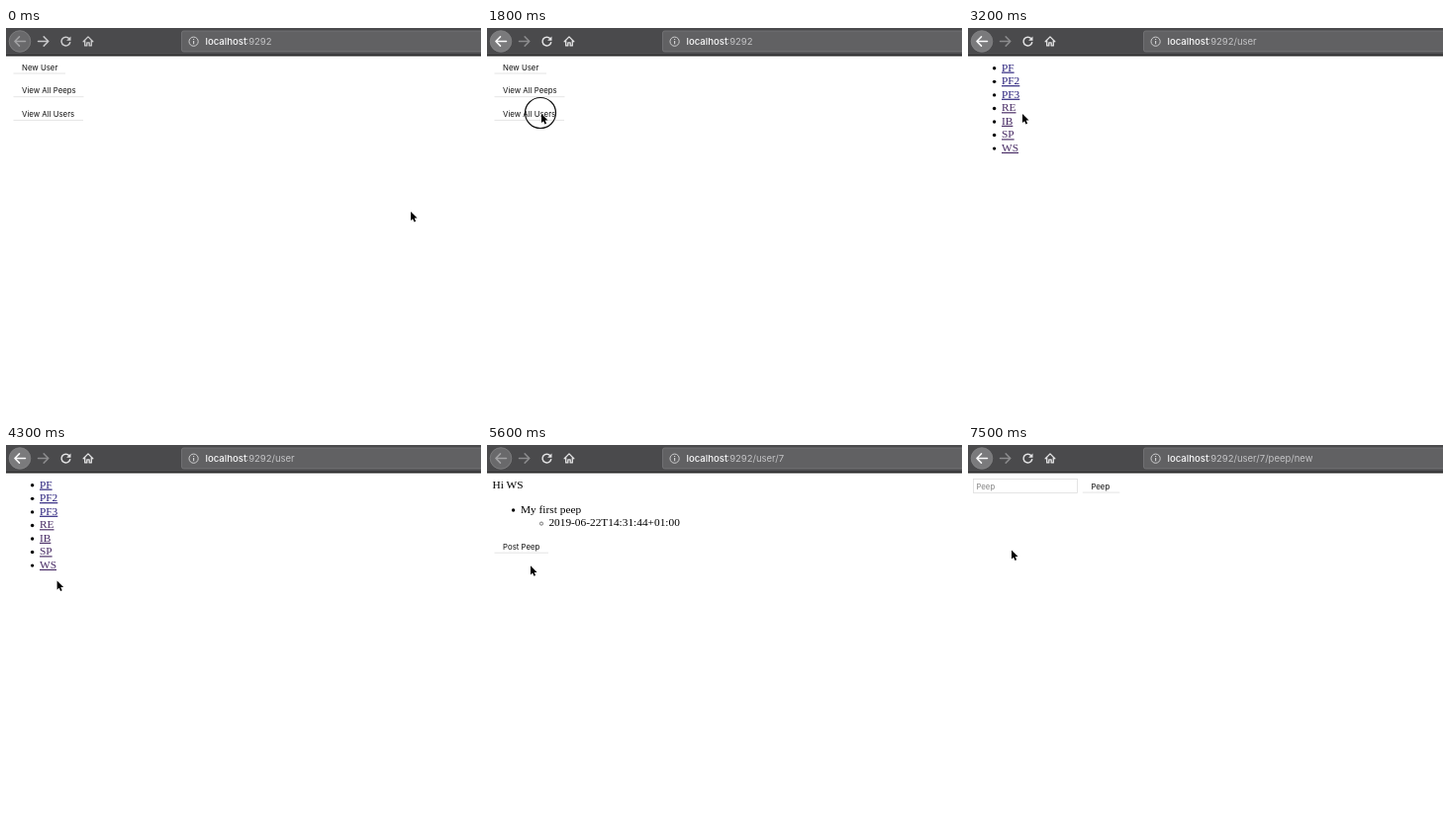
Recreate the animation shown at these times as an HTML page. Size 480 by 394 pixels, loop 8000 ms.

```html
<!DOCTYPE html>
<html lang="en">
<head>
<meta charset="utf-8">
<style>
  html, body { margin: 0; width: 100%; height: 100%; overflow: hidden; background: #fff; }
  svg { display: block; width: 100%; height: 100%; }
  .ui { font: 7.8px Inter, Roboto, sans-serif; fill: #111; }
  .doc { font: 11.35px "Liberation Serif", serif; }
  .url { font: 500 9.6px Inter, Roboto, sans-serif; fill: #f9f9fa; }
  #path { font-size: 9.5px; font-weight: 400; fill: #c4c4c6; }
  .icon { fill: none; stroke: #e4e4e5; stroke-width: 1.5; stroke-linecap: round; stroke-linejoin: round; }
  .edge { fill: none; stroke: #dedede; stroke-width: .8; }
</style>
</head>
<body>
<svg viewBox="0 0 480 394">
  <defs>
    <linearGradient id="blue" x2="0" y2="1">
      <stop stop-color="#6ba6f8"/><stop offset="1" stop-color="#2c66e6"/>
    </linearGradient>
  </defs>

  <rect width="480" height="28" fill="#4a4a4c"/>
  <rect y="27.4" width="480" height="1.1" fill="#161617"/>
  <circle id="disc" cx="14" cy="13.5" r="10.8" stroke="#88888a" stroke-width=".7"/>
  <path id="back" class="icon" d="M19.5 13.5H8.9M13.5 8.9L8.9 13.5L13.5 18.1"/>
  <path id="forward" class="icon" d="M32.5 13.5H42.8M38.2 8.9L42.8 13.5L38.2 18.1"/>
  <g id="tools">
    <path class="icon" d="M63.9 10.8A4.4 4.4 0 1 0 64.7 14.8"/>
    <path d="M65.5 8.4V12.8H61.1Z" fill="#e4e4e5"/>
    <path class="icon" style="stroke-width:1.3" d="M78.2 13.7L83 8.9L87.8 13.7M79.7 12.8V17.9H81.8V14.9H84.2V17.9H86.3V12.8"/>
  </g>
  <rect x="177.5" y="3" width="310" height="21" rx="2" fill="#616163" stroke="#78787a" stroke-width=".8"/>
  <g fill="none" stroke="#cfcfd0">
    <circle cx="189.6" cy="13.7" r="4.6"/>
    <path d="M189.6 13V16.3M189.6 10.9V12" stroke-width="1.2"/>
  </g>
  <text class="url" x="201.5" y="17.2">localhost</text>
  <text class="url" id="path" x="242.4" y="17.2"></text>

  <g id="home"></g>
  <g id="list" class="doc"></g>
  <g id="user" class="doc">
    <text x="5.5" y="43.6">Hi WS</text>
    <circle cx="26.6" cy="66" r="1.7"/>
    <text x="34" y="68.7">My first peep</text>
    <circle cx="55" cy="79.6" r="1.6" fill="none" stroke="#444" stroke-width=".7"/>
    <text x="62.4" y="82.2">2019-06-22T14:31:44+01:00</text>
  </g>
  <g id="form">
    <rect class="edge" x="5.5" y="34.5" width="105" height="14"/>
    <text class="ui" x="8.4" y="44.7" style="fill:#858585">Peep</text>
  </g>

  <circle id="ring" r="15.5" fill="none" stroke="#111" stroke-width="1.2"/>
  <g id="arrow">
    <path transform="scale(.86)" d="M0 0V10.6L2.4 8.4L4.1 12.2L5.9 11.4L4.3 7.7H7.6Z" stroke="#fff" stroke-width=".7" paint-order="stroke"/>
  </g>
  <g id="hand">
    <path transform="translate(-1.8 1.2) rotate(-24) scale(.88)" fill="#fff" stroke="#111" stroke-width=".9" stroke-linejoin="round"
      d="M-.9 .8Q0 -.4 .9 .8V4Q2 3.2 2.8 4.3Q4 3.7 4.6 4.8Q6.2 4.5 6.2 6V8.3L5.2 10.5V12H-.4V10.8L-2.8 7.4Q-3.4 5.9 -2.2 6L-.9 7.2Z"/>
  </g>
</svg>
<script>
const $ = id => document.getElementById(id);
const add = (id, markup) => $(id).insertAdjacentHTML("beforeend", markup);
const show = (id, on) => $(id).style.display = on ? "" : "none";

function button(page, label, x, y, width, pressId) {
  const fill = pressId
    ? `<rect id="${pressId}" x="${x}" y="${y - 8}" width="${width}" height="11.2" rx="2" fill="url(#blue)"/>` : "";
  add(page, `<path class="edge" d="M${x + 1} ${y + 3.4}h${width - 2}"/>${fill}
    <text class="ui" x="${x + 9.6}" y="${y}">${label}</text>`);
}
button("home", "New User", 6.5, 42.6, 54.5);
button("home", "View All Peeps", 6.5, 66.3, 73);
button("home", "View All Users", 6.5, 90, 72.5, "usersPress");
button("user", "Post Peep", 6.5, 105.8, 56.5, "postPress");
button("form", "Peep", 114.8, 44.7, 39.5);

["PF", "PF2", "PF3", "RE", "IB", "SP", "WS"].forEach((name, i) => {
  const y = 43.6 + 13.55 * i;
  add("list", `<circle cx="26.6" cy="${y - 2.8}" r="1.7"/>
    <text id="link${i}" x="34" y="${y}" fill="${i < 3 ? "#231a78" : "#452862"}" text-decoration="underline">${name}</text>`);
});

// time, x, y of the pointer tip
const track = [
  [100, 409, 186], [300, 345, 140], [500, 170, 62], [700, 13, 16], [850, 32, 58], [1000, 54, 87.5],
  [1100, 55, 87], [3900, 55, 87], [4100, 80, 112], [4300, 51.6, 137.5], [4800, 43, 134],
  [5100, 43, 134], [5200, 44, 122.5], [6300, 44, 122], [6800, 44, 107.5], [7100, 44, 106.5]
];

function pointer(t) {
  const i = track.findIndex(k => k[0] >= t);
  if (i < 0) return track[track.length - 1].slice(1);
  if (!i) return track[0].slice(1);
  const [a, b] = [track[i - 1], track[i]];
  const u = (t - a[0]) / (b[0] - a[0]);
  return [1, 2].map(n => a[n] + (b[n] - a[n]) * u);
}

const pages = [
  ["home", 0, ":9292"], ["list", 3100, ":9292/user"],
  ["user", 5500, ":9292/user/7"], ["form", 7400, ":9292/user/7/peep/new"]
];
const clicks = [[1800, 2100], [2800, 3000], [5400, 5500], [7200, 7400]];

function draw(now) {
  const t = Math.floor(now % 8000 / 100) * 100;
  const within = (from, to) => t >= from && t < to;
  const page = pages.filter(p => t >= p[1]).pop();
  pages.forEach(p => show(p[0], p === page));
  $("path").textContent = page[2];

  const focused = t >= 1700;
  const canBack = within(1700, 5600) || t >= 7500;
  $("disc").style.fill = canBack ? "#7a7a7c" : "#69696b";
  $("back").style.stroke = canBack ? "#f9f9fa" : "#a2a2a4";
  $("forward").style.stroke = focused ? "#8b8b8d" : "#c6c6c8";
  $("tools").style.opacity = focused ? 1 : .86;

  show("usersPress", t >= 2800);
  show("postPress", t >= 7300);
  $("link6").style.fill = t >= 5300 ? "#a01c1c" : "";

  const [x, y] = pointer(t);
  const hand = within(5200, 5600);
  show("hand", hand);
  show("arrow", !hand);
  show("ring", clicks.some(c => within(...c)));
  for (const id of ["hand", "arrow"]) $(id).setAttribute("transform", `translate(${x} ${y})`);
  $("ring").setAttribute("transform", `translate(${x - 1} ${y - 1})`);
}

const start = performance.now();
(function loop() {
  draw(performance.now() - start);
  requestAnimationFrame(loop);
})();
</script>
</body>
</html>
```
